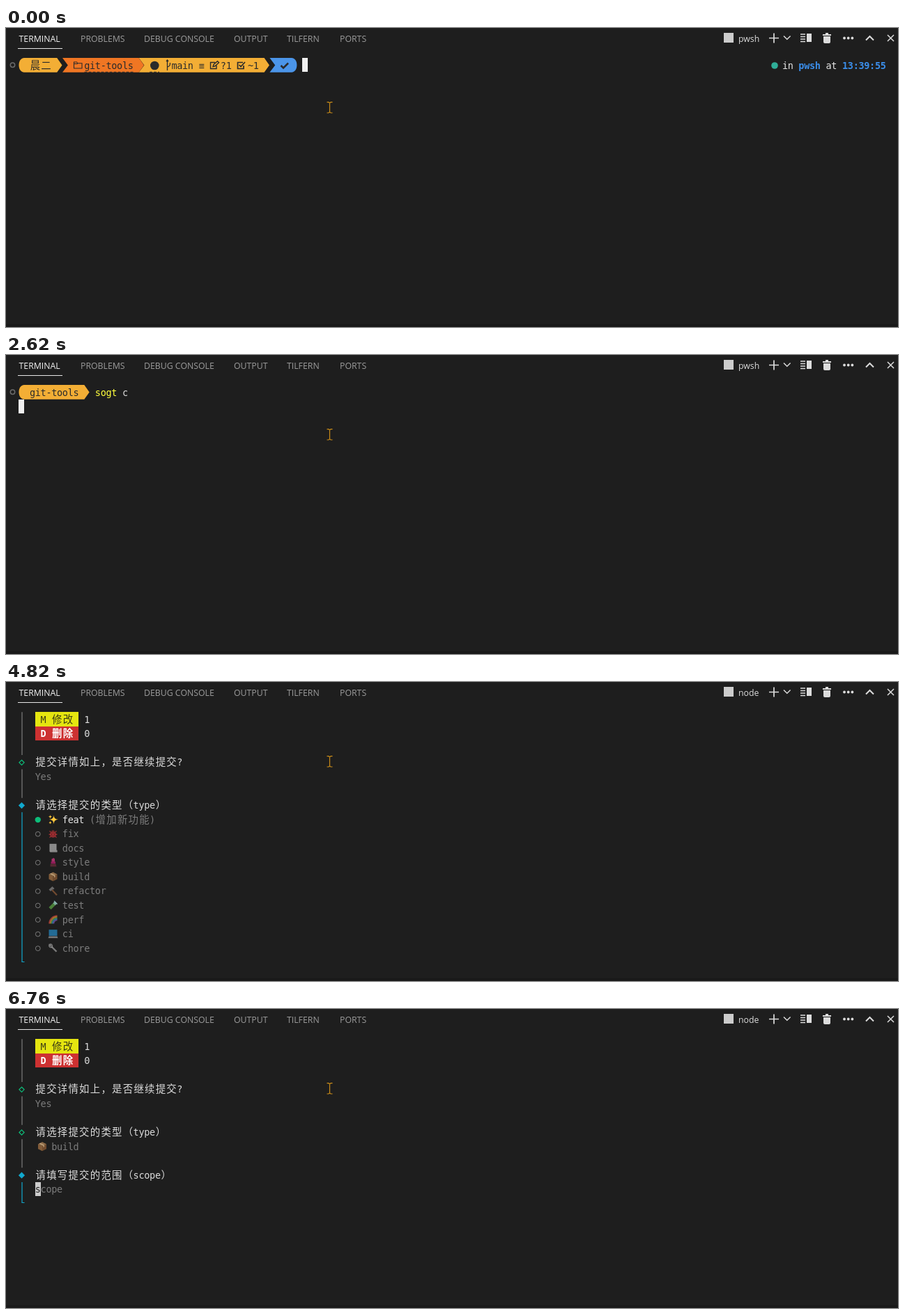
These frames come from a looping animation (1280 px wide and 430 px high, 8 s). An HTML page with a canvas:

```html
<!DOCTYPE html>
<html lang="zh-CN">
<head>
<meta charset="utf-8">
<title>Terminal commit flow</title>
<style>
html, body { margin: 0; width: 100%; height: 100%; overflow: hidden; background: #1e1e1e; }
canvas { display: block; }
</style>
</head>
<body>
<canvas id="stage" width="1280" height="430"></canvas>
<script>
const ctx = document.getElementById('stage').getContext('2d');
const LOOP = 8000, CELL = 7.826, LINE = 20.56, LEFT = 18.4, TOP = 43.3;
const MONO = '13.5px "DejaVu Sans Mono", monospace';
const CJK = '14.4px "Noto Sans CJK SC", "Noto Sans CJK", sans-serif';
const UI = '12.3px "Open Sans", "Noto Sans", sans-serif';
const BG = '#1e1e1e', FG = '#dcdcdc', DIM = '#7c7c7c', INK = '#2b2b2b', WHITE = '#f0f0f0';
const CYAN = '#11a8cd', GREEN = '#0dbc79', YELLOW = '#e5e510', RED = '#cd3131';
const AMBER = '#f3ae35', ORANGE = '#f07623', BLUE = '#4b95e9', COMMAND = '#ffff3c';

const colX = c => LEFT + c * CELL;
const rowY = r => TOP + r * LINE;
const midY = r => rowY(r) + LINE / 2;

function rect(x, y, w, h, color) {
  ctx.fillStyle = color;
  ctx.fillRect(x, y, w, h);
}

function fill(d, color) {
  ctx.fillStyle = color;
  ctx.fill(new Path2D(d));
}

function stroke(d, color, width = 1) {
  ctx.strokeStyle = color;
  ctx.lineWidth = width;
  ctx.stroke(new Path2D(d));
}

function circle(x, y, r, color, width) {
  ctx.beginPath();
  ctx.arc(x, y, r, 0, 7);
  if (width) {
    ctx.strokeStyle = color;
    ctx.lineWidth = width;
    ctx.stroke();
  } else {
    ctx.fillStyle = color;
    ctx.fill();
  }
}

// Writes on the terminal grid; CJK characters take two cells.
function put(col, row, text, color = FG, bold = false) {
  ctx.textAlign = 'center';
  ctx.fillStyle = color;
  for (const ch of text) {
    const cells = ch > '\u2e80' ? 2 : 1;
    ctx.font = (bold ? 'bold ' : '') + (cells > 1 ? CJK : MONO);
    ctx.fillText(ch, colX(col + cells / 2), Math.round(rowY(row) + 15.4));
    col += cells;
  }
  return col;
}

function label(x, text, color) {
  ctx.textAlign = 'left';
  ctx.font = UI;
  ctx.fillStyle = color;
  ctx.fillText(text, x, 19.5);
}

function block(col, row, color = WHITE) {
  rect(Math.round(colX(col)), Math.round(rowY(row)), 8, 20, color);
}

function badge(row, cells, text, color, ink, bold) {
  const x = Math.round(colX(3)), y = Math.round(rowY(row));
  rect(x, y, Math.round(colX(3 + cells)) - x, Math.round(rowY(row + 1)) - y, color);
  put(4, row, text, ink, bold);
}

// ---- window chrome ----

function drawChrome(shell) {
  rect(0, 0, 1280, 430, BG);
  rect(0, 426, 1280, 4, '#191919');
  const tabs = [[107, 'PROBLEMS'], [198, 'DEBUG CONSOLE'], [327, 'OUTPUT'], [403, 'TILFERN'], [479, 'PORTS']];
  label(18.5, 'TERMINAL', '#f2f2f2');
  for (const [x, name] of tabs) label(x, name, '#9c9c9c');
  rect(17, 29, 64, 1, '#e7e7e7');

  rect(1030, 7, 14, 14, '#cccccc');
  label(1051, shell, FG);
  stroke('M1095 14.5H1109M1102 7.5V21.5', FG, 1.7);
  stroke('M1116 11.5L1120.8 16.3L1125.6 11.5', FG, 1.5);
  stroke('M1140 9H1147M1140 12.5H1147M1140 16H1147M1140 19.5H1147', FG, 1.4);
  rect(1149, 8, 7, 12, FG);
  fill('M1172 9H1176V7H1180V9H1184V11H1172ZM1173 12H1183V20Q1183 22 1181 22H1175Q1173 22 1173 20Z', FG);
  for (const x of [1203, 1208.7, 1214.4]) circle(x, 14.5, 1.9, FG);
  stroke('M1234 17.5L1239.5 12L1245 17.5', FG, 2);
  stroke('M1265 10L1274 19M1274 10L1265 19', FG, 1.5);
}

function drawPointer() {
  stroke('M460.5 106.7H463L464.5 108L466 106.7H468.5M464.5 108V121M460.5 122H463L464.5 120.7L466 122H468.5', '#c98c18', 1.2);
}

// ---- prompts ----

// Segment between two columns with a round, notched or pointed end on each side.
function segment(c1, c2, color, start, end) {
  const x1 = colX(c1), x2 = colX(c2), a = x1 + CELL, b = x2 - CELL;
  const y1 = 43, y2 = 63.7, m = 53.4;
  const right = end === 'round'
    ? `H${b}C${x2 + 2.5} ${y1} ${x2 + 2.5} ${y2} ${b} ${y2}`
    : `H${b}L${x2 - 0.5} ${m}L${b} ${y2}`;
  const left = start === 'round'
    ? `H${a}C${x1 - 2.5} ${y2} ${x1 - 2.5} ${y1} ${a} ${y1}Z`
    : `H${x1}L${a} ${m}L${x1} ${y1}Z`;
  fill(`M${start === 'round' ? a : x1} ${y1}${right}${left}`, color);
}

function drawPrompt() {
  segment(0, 8, AMBER, 'round', 'point');
  segment(22, 46, AMBER, 'notch', 'point');
  segment(8, 23, ORANGE, 'notch', 'point');
  segment(46, 51, BLUE, 'notch', 'round');
  put(2, 0, '晨二', INK);
  stroke('M97.5 49H101.5L103 50.8H109V58H97.5ZM97.5 51.5H103', INK, 1.1);
  put(12, 0, 'git-tools', INK);
  circle(213.3, 54, 6.3, INK);
  stroke('M231.5 46V61M231.5 56C235.5 55 235.5 53 235.5 50M230 48L231.5 46L233 48', INK, 1.3);
  put(28, 0, 'main ≡', INK);
  stroke('M302 54V58.5H293.5V49.5H300M297 55.5L298 52.5L303.5 47.8L305.5 49.8L300 54.8Z', INK, 1.4);
  put(37, 0, '?1', INK);
  stroke('M341 54V58.5H332.5V49.5H340M334.5 53L337 55.5L343 49', INK, 1.7);
  put(42, 0, '~1', INK);
  stroke('M394.5 54L398 57.5L405 50.5', INK, 2.6);
  ctx.setLineDash([4, 2]);
  stroke('M112.5 63.3H183M206 63.3H220', INK);
  ctx.setLineDash([]);

  circle(1103, 54, 4.8, '#2fae98');
  put(140, 0, 'in', '#e5e5e5');
  put(143, 0, 'pwsh', '#3b8eea', true);
  put(148, 0, 'at', '#e5e5e5');
  put(151, 0, '13:39:55', '#3b8eea', true);
}

function drawTyping(t) {
  const line = 'sogt c', keys = [600, 800, 1300, 1520, 2020, 2120];
  const n = keys.filter(k => t >= k).length;
  block(52 + n, 0);
  if (!n) return;
  put(52 + n, 0, line.slice(n), DIM);
  const end = put(52, 0, line.slice(0, Math.min(n, 4)), COMMAND);
  put(end, 0, line.slice(4, Math.max(n, 4)));
}

function drawShortPrompt() {
  segment(0, 13, AMBER, 'round', 'point');
  put(2, 0, 'git-tools', INK);
  put(14, 0, 'sogt', COMMAND);
  put(19, 0, 'c');
}

// ---- commit flow ----

const GUTTER = 23;

function bar(from, to, color = '#6a6a6a') {
  stroke(`M${GUTTER} ${rowY(from)}V${rowY(to + 1)}`, color, 1.5);
}

function activeBar(from, to) {
  stroke(`M${GUTTER} ${rowY(from)}V${Math.floor(midY(to)) - 0.5}H26.5`, CYAN, 1.2);
}

function question(row, text, active) {
  const y = midY(row) + 0.6, r = active ? 4.6 : 3.6;
  const d = `M${GUTTER - 0.5} ${y - r}l${r} ${r}l${-r} ${r}l${-r} ${-r}Z`;
  active ? fill(d, CYAN) : stroke(d, GREEN, 1.2);
  put(3, row, text);
}

function radio(col, row, on) {
  const x = colX(col) + CELL / 2, y = midY(row) + 0.6;
  on ? circle(x, y, 4.2, GREEN) : circle(x, y, 3.4, DIM, 1);
}

function drawIntro() {
  stroke(`M26.5 ${midY(1)}H${GUTTER}V${rowY(2)}`, '#6a6a6a', 1.3);
  badge(1, 23, '进入 sogt commit 流程', CYAN, BG, true);
}

function drawChanges(row) {
  badge(row, 8, 'M 修改', YELLOW, '#3b3b14');
  put(12, row, '1');
  badge(row + 1, 8, 'D 删除', RED, '#ffffff', true);
  put(12, row + 1, '0');
}

const ASK = '提交详情如上，是否继续提交?';

function drawConfirm() {
  bar(2, 8);
  let col = put(3, 3, '当前分支: ');
  col = put(col, 3, 'main', '#23d18b', true);
  put(col, 3, ', ahead: 0, behind: 0');
  put(3, 4, '暂存文件:');
  badge(5, 8, 'A 新增', GREEN, BG);
  put(12, 5, '0');
  drawChanges(6);
  question(9, ASK, true);
  radio(3, 10, true);
  put(5, 10, 'Yes');
  put(9, 10, '/', DIM);
  radio(11, 10, false);
  put(13, 10, 'No', DIM);
  activeBar(10, 11);
}

function drawAnswered() {
  bar(0, 2);
  drawChanges(0);
  question(3, ASK, false);
  bar(4, 5);
  put(3, 4, 'Yes', DIM);
}

const star = (x, y, r) =>
  `M${x} ${y - r}Q${x} ${y} ${x + r} ${y}Q${x} ${y} ${x} ${y + r}Q${x} ${y} ${x - r} ${y}Q${x} ${y} ${x} ${y - r}Z`;

// Each icon is painted in a 14 by 14 box.
const icons = {
  feat() {
    fill(star(8, 7, 6.5) + star(3, 3, 3) + star(3, 11.5, 2.8), '#ffc83d');
    fill('M8 3L9.3 5.7L12 7L9.3 8.3L8 11L6.7 8.3L4 7L6.7 5.7Z', '#ffc83d');
  },
  fix() {
    stroke('M2 3L4 5M12 3L10 5M1 8H13M2 12.5L4 10.5M12 12.5L10 10.5', '#e03a3e', 1.3);
    circle(7, 8, 4.5, '#d9343a');
    circle(7, 3.8, 2.2, '#8c2f2f');
    for (const x of [5, 9]) circle(x, 8, 1.1, '#3a1a1a');
  },
  docs() {
    fill('M2 1H12V10H13V13H3L2 12Z', '#d8d8d8');
    stroke('M4 3.5H10M4 6H10M4 8.5H10M5 11.5H13', '#777777');
  },
  style() {
    fill('M5 6V2L8 0.5L9.5 2V6Z', '#ff3f9a');
    rect(4, 6, 6.5, 3, '#e01a83');
    fill('M3 9H11L12 13H3Z', '#7b3040');
  },
  build() {
    fill('M7 0.5L13 3.5L7 6.5L1 3.5Z', '#d9a066');
    fill('M1 3.5L7 6.5V13.5L1 10.5Z', '#c4854b');
    fill('M13 3.5L7 6.5V13.5L13 10.5Z', '#a86a38');
    fill('M4 2L10 5V7.5L8.5 8V5.7L2.6 2.7Z', '#ead0a5');
  },
  refactor() {
    stroke('M5.5 5.5L12.5 13', '#a9673c', 2.2);
    fill('M1 5L6 0.5L9 3.5L7.5 5L6.5 4.5L3.5 7.5Z', '#9a9a9a');
  },
  test() {
    stroke('M2.5 11.5L11 3', '#68c04b', 4.5);
    stroke('M8.5 5.5L11 3', '#9bc7d4', 4.5);
    stroke('M8.5 0.8L13.2 5.5', '#a8dbe8', 1.5);
  },
  perf() {
    ['#ee4b45', '#ffb13b', '#5fc45b', '#3b9df0', '#9e62d0'].forEach((color, i) => {
      const r = 11.5 - i * 1.6;
      stroke(`M${13 - r} 13A${r} ${r} 0 0 1 13 ${13 - r}`, color, 1.7);
    });
  },
  ci() {
    rect(1, 1, 12, 9, '#279fe5');
    fill('M1 10.5H13L14 13H0Z', '#b5b5b5');
  },
  chore() {
    stroke('M5 5L12 12', '#b8b8b8', 2.4);
    stroke('M2 1.5L4.2 3.7L3.7 4.2L1.5 2C0.5 5 3 7 5.5 5.5C7 3 5 0.5 2 1.5', '#b8b8b8', 1.4);
  }
};

function icon(name, x, row, bright) {
  ctx.save();
  ctx.translate(x, midY(row) - 6.8);
  ctx.globalAlpha = bright ? 1 : 0.6;
  icons[name]();
  ctx.restore();
}

const hints = {
  feat: '增加新功能',
  fix: '修复缺陷',
  docs: '仅文档内容变更',
  style: '代码格式改动，不改变语义',
  build: '影响构建系统或外部依赖项的更改'
};
const ASK_TYPE = '请选择提交的类型（type）';

function drawTypes(t) {
  const picked = t < 5340 ? 'feat' : t < 5640 ? 'fix' : t < 5940 ? 'docs' : t < 6140 ? 'style' : 'build';
  question(6, ASK_TYPE, true);
  Object.keys(icons).forEach((name, i) => {
    const row = 7 + i, on = name === picked;
    radio(3, row, on);
    icon(name, 60.5, row, on);
    const end = put(8, row, name, on ? '#e5e5e5' : DIM);
    if (on) put(end + 1, row, `(${hints[name]})`, DIM);
  });
  activeBar(7, 17);
}

function drawScope() {
  question(6, ASK_TYPE, false);
  bar(7, 8);
  icon('build', 45, 7, false);
  put(6, 7, 'build', DIM);
  question(9, '请填写提交的范围（scope）', true);
  block(3, 10, '#cccccc');
  put(3, 10, 's', BG);
  put(4, 10, 'cope', DIM);
  activeBar(10, 11);
}

function draw(t) {
  drawChrome(t < 3530 ? 'pwsh' : 'node');
  if (t < 4820) circle(9.5, 53.3, 3.2, '#6b6b6b', 1.5);
  if (t < 2520) {
    drawPrompt();
    drawTyping(t);
  } else if (t < 4820) {
    drawShortPrompt();
    if (t < 2620) block(20, 0);
    else if (t < 3530) block(0, 1);
    else drawIntro();
    if (t >= 3720) drawConfirm();
    else if (t >= 3530) block(0, 2);
  } else {
    drawAnswered();
    t < 6760 ? drawTypes(t) : drawScope();
  }
  drawPointer();
}

const start = performance.now();
function tick() {
  draw((performance.now() - start) % LOOP);
  requestAnimationFrame(tick);
}
tick();
</script>
</body>
</html>
```
